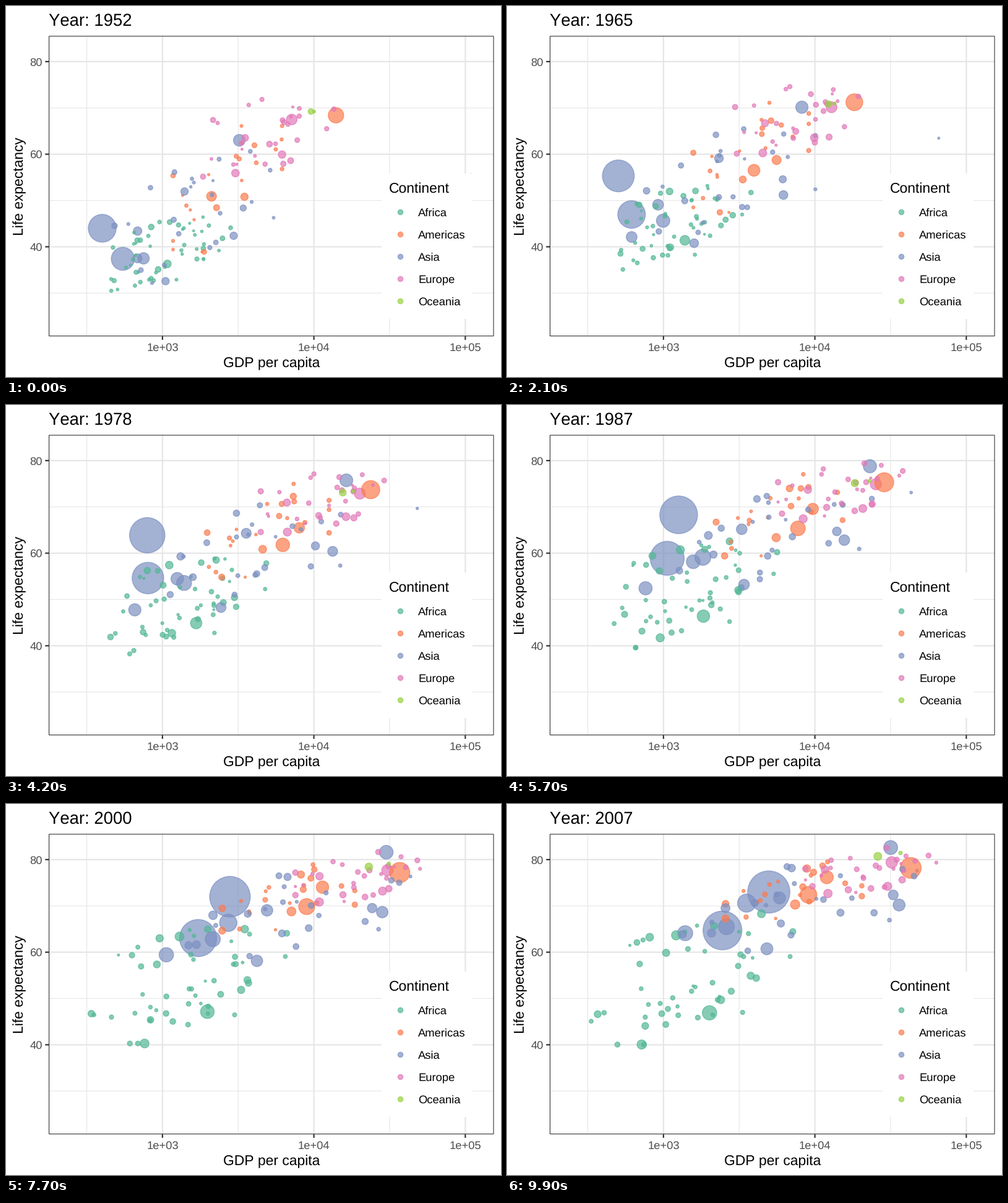
Animation of 800 by 600 pixels, one loop 10000 ms. Source, as a matplotlib script:

```python
import numpy as np
import matplotlib.pyplot as plt
from matplotlib.animation import FuncAnimation
from matplotlib.colors import to_rgba
from matplotlib.patches import Rectangle

W, H, DPI = 800, 600, 100
PT = 72 / DPI
FRAMES, MOVING = 100, 90
COLORS = {"Africa": "#53B796", "Americas": "#FB7C4F", "Asia": "#7C90C1",
          "Europe": "#E279B8", "Oceania": "#97D042"}
AF, AM, AS, EU, OC = COLORS
GRID, DARK, TICK = "#E6E6E6", "#333333", "#4D4D4D"
LEFT, RIGHT, TOP, BOTTOM = 69, 788.5, 48.3, 534.2

times = np.minimum(np.arange(FRAMES) / (MOVING - 1), 1)
rng = np.random.default_rng(1952)
tracks = []


def curve(start, middle, end):
    """Parabola through three values, evenly spaced in time."""
    bend = 2 * (start + end - 2 * middle)
    return start + (end - start - bend) * times + bend * times ** 2


def ramp(start, end):
    return start + (end - start) * times


def x_pos(log_gdp):
    return 252.9 + 244.7 * (log_gdp - 3)


def y_pos(life):
    return 89.9 + 7.4875 * (80 - life)


def push(group, pop, log_gdp, life):
    size = 0.1 + 14.9 * np.sqrt(pop / 1319)
    tracks.append((to_rgba(COLORS[group], 0.7), x_pos(log_gdp), y_pos(life),
                   0.734 + 2.223 * size))


def bubble(group, pop, gdp, life):
    push(group, ramp(*pop), curve(*np.log10(gdp)), curve(*life))


def drift(corr=0.75, knots=12):
    """A standard score that wanders from one value to a related one."""
    a, e = rng.normal(size=2)
    wobble = rng.normal(0, 0.1, knots)
    return np.clip(ramp(a, corr * a + np.sqrt(1 - corr ** 2) * e)
                   + np.interp(times, np.linspace(0, 1, knots), wobble), -1.8, 1.8)


def swarm(group, count, pop, growth, gdp, gdp_sd, life, life_sd):
    """Small bubbles scattered around the moving mean of their group."""
    for _ in range(count):
        zx = drift()
        zl = np.clip(0.6 * zx + 0.8 * drift(), -1.7, 1.7)
        p = pop * np.exp(np.clip(rng.normal(), -2.2, 1.8))
        push(group, ramp(p, p * growth), curve(*gdp) + zx * ramp(*gdp_sd),
             curve(*life) + zl * ramp(*life_sd))


# The largest bubbles: millions of people, then start, middle and end values.
bubble(AS, (47, 150), (684, 669, 1391), (37.5, 48.5, 64.1))
bubble(AM, (57, 190), (2109, 6500, 9066), (50.9, 62.4, 72.4))
bubble(AS, (556, 1319), (400, 850, 4959), (44, 64.7, 73))
bubble(EU, (69, 82), (7144, 21000, 32170), (67.5, 73.2, 79.4))
bubble(AS, (372, 1110), (547, 835, 2452), (37.4, 55.4, 64.7))
bubble(AS, (82, 223), (750, 1450, 3541), (37.5, 54.5, 70.6))
bubble(AS, (86, 127), (3217, 17500, 31656), (63, 76.3, 82.6))
bubble(AS, (0.2, 2.5), (108382, 47000, 47307), (55.6, 70.3, 77.6))
bubble(AM, (30, 109), (3478, 8300, 11978), (50.8, 66.2, 76.2))
bubble(AF, (33, 135), (1077, 1700, 2014), (36.3, 45.2, 46.9))
bubble(AS, (41, 169), (685, 1300, 2606), (43.4, 55.1, 65.5))
bubble(AM, (158, 301), (13990, 24500, 42952), (68.4, 74, 78.2))

swarm(AF, 51, 2.6, 3.2, (3, 3.13, 3.17), (0.25, 0.38), (39, 50, 54.5), (5, 8.5))
swarm(AM, 22, 3, 2.8, (3.43, 3.71, 3.86), (0.2, 0.25), (52.5, 65.5, 73.4), (8, 3.6))
swarm(AS, 26, 5, 3, (3.14, 3.55, 3.83), (0.33, 0.47), (47.5, 61.5, 70.5), (9, 6))
swarm(EU, 29, 8, 1.25, (3.7, 4.1, 4.37), (0.24, 0.24), (64.5, 72.2, 77.6), (5.5, 2.9))
swarm(OC, 2, 4, 2.2, (4.01, 4.25, 4.47), (0.02, 0.06), (69.3, 73.5, 80.7), (0.2, 0.5))

fills = [t[0] for t in tracks]
xs, ys, radii = (np.array([t[k] for t in tracks]) for k in (1, 2, 3))

plt.rcParams.update({"font.family": "Liberation Sans", "text.hinting": "none",
                     "text.kerning_factor": 6})
fig = plt.figure(figsize=(W / DPI, H / DPI), dpi=DPI, facecolor="white")
ax = fig.add_axes([0, 0, 1, 1])
ax.set(xlim=(0, W), ylim=(H, 0))
ax.axis("off")


def line(x, y, width, color, z):
    ax.plot(x, y, lw=width * PT, color=color, zorder=z, snap=False,
            solid_capstyle="butt")


def text(x, y, s, px, color="black", **kw):
    return ax.text(x, y, s, fontsize=px * PT, color=color, zorder=8,
                   va="baseline", **kw)


def area(r):
    return (2 * r * PT) ** 2


def dots(x, y, r, colors, z):
    return ax.scatter(x, y, s=area(r), c=colors, edgecolors=colors,
                      linewidths=1.47 * PT, zorder=z)


for v in (2.5, 3.5, 4.5):
    line([x_pos(v)] * 2, [TOP, BOTTOM], 1.11, GRID, 1)
for v in (30, 50, 70):
    line([LEFT, RIGHT], [y_pos(v)] * 2, 1.11, GRID, 1)
for v in (3, 4, 5):
    x = x_pos(v)
    line([x, x], [TOP, BOTTOM], 2.22, GRID, 2)
    line([x, x], [BOTTOM, BOTTOM + 5.7], 2.22, DARK, 5)
    text(x, 558, f"1e+0{v}", 18.33, TICK, ha="center")
for v in (40, 60, 80):
    y = y_pos(v)
    line([LEFT, RIGHT], [y, y], 2.22, GRID, 2)
    line([LEFT - 5.7, LEFT], [y, y], 2.22, DARK, 5)
    text(58.8, y + 6.6, str(v), 18.33, TICK, ha="right")

cloud = dots(xs[:, 0], ys[:, 0], radii[:, 0], fills, 3)

ax.add_patch(Rectangle((LEFT + 0.55, TOP + 0.55), RIGHT - LEFT - 1.1,
                       BOTTOM - TOP - 1.1, fill=False, ec=DARK, lw=1.11 * PT,
                       zorder=4, snap=False))
ax.add_patch(Rectangle((607, 271), 147, 235, fc="white", ec="none", zorder=6))
text(618.5, 302, "Continent", 22.9)
for k, (name, color) in enumerate(COLORS.items()):
    y = 333.2 + 36 * k
    dots([636.7], [y], 4.07, [to_rgba(color, 0.7)], 7)
    text(666, y + 6.9, name, 18.33)

text((LEFT + RIGHT) / 2, 584.5, "GDP per capita", 22.9, ha="center")
text(28, (TOP + BOTTOM) / 2, "Life expectancy", 22.9, rotation=90,
     rotation_mode="anchor", ha="center")
title = text(LEFT, 32, "Year: 1952", 27.5)


def update(i):
    cloud.set_offsets(np.column_stack((xs[:, i], ys[:, i])))
    cloud.set_sizes(area(radii[:, i]))
    title.set_text(f"Year: {round(1952 + 55 * times[i])}")
    return cloud, title


anim = FuncAnimation(fig, update, frames=FRAMES, interval=100, repeat=True,
                     repeat_delay=0)
plt.show()
```
